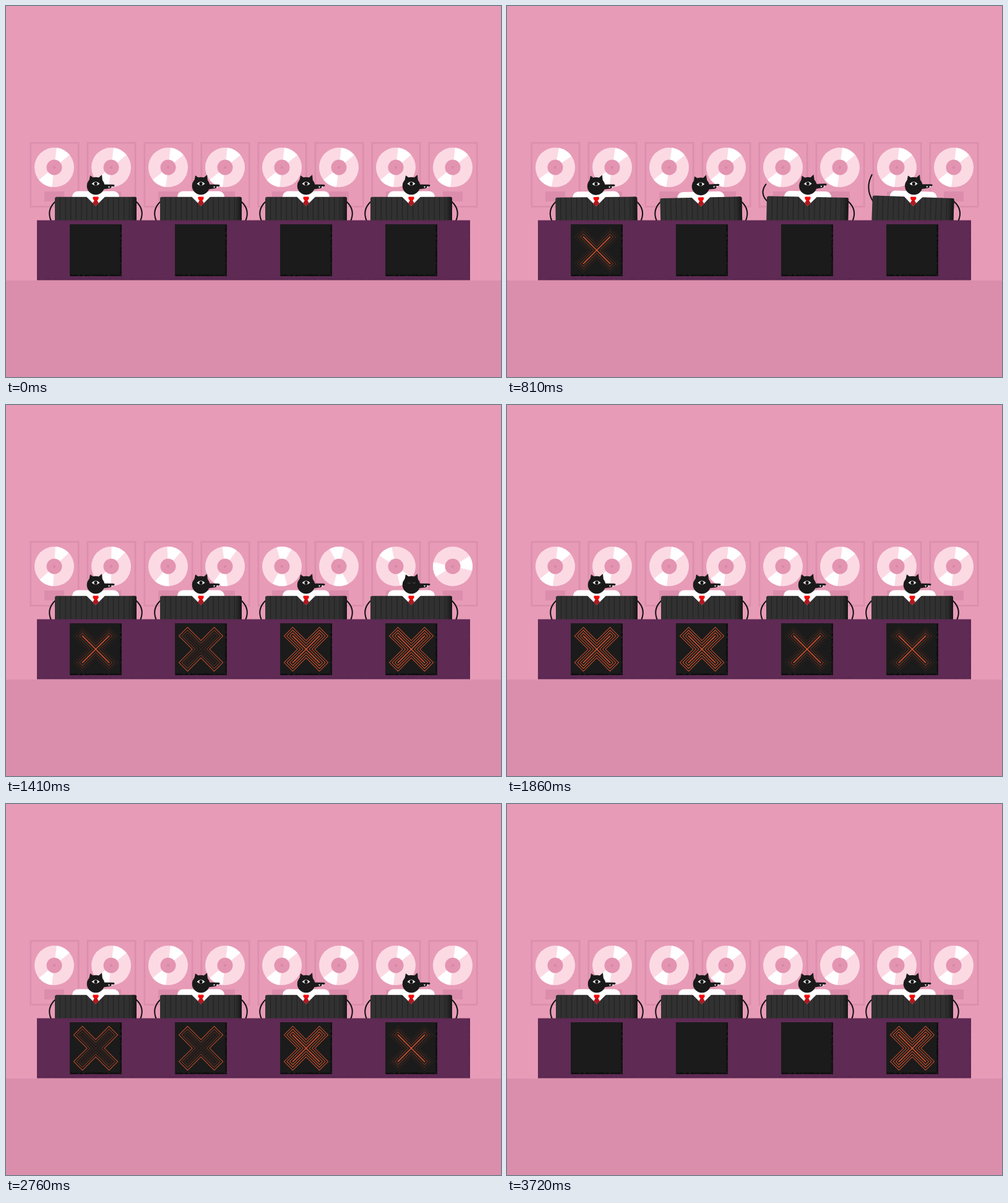
An HTML page with a canvas for the animation above (3.75 s loop, 800x600 px).

```html
<!DOCTYPE html>
<html lang="en">
<head>
<meta charset="utf-8">
<title>Four judges</title>
<style>
  html, body { margin: 0; width: 100%; height: 100%; overflow: hidden; background: #e79bb7; }
  canvas { display: block; width: 800px; height: 600px; }
</style>
</head>
<body>
<canvas id="stage" width="800" height="600"></canvas>
<script>
const ctx = document.getElementById('stage').getContext('2d');
const LOOP = 3750, STEP = 30, JUDGE_DELAY = 150;
const INK = '#1a1a1a';

const rad = d => d * Math.PI / 180;

// Smooth 0 to 1 between two times
function ramp(t, from, to) {
  const u = Math.min(1, Math.max(0, (t - from) / (to - from)));
  return u * u * (3 - 2 * u);
}

// Smooth rise to a peak and back
const bump = (t, from, peak, to) => ramp(t, from, peak) - ramp(t, peak, to);

// Symmetric, steep ease-in-out: cubic-bezier(.91, 0, .09, 1)
function steep(x) {
  if (x <= 0) return 0;
  if (x >= 1) return 1;
  let lo = 0, hi = 1, s;
  for (let i = 0; i < 24; i++) {
    s = (lo + hi) / 2;
    const v = 1 - s;
    if (2.73 * v * v * s + .27 * v * s * s + s * s * s < x) lo = s; else hi = s;
  }
  return s * s * (3 - 2 * s);
}

function box(x, y, w, h, color, r = 0) {
  ctx.fillStyle = color;
  ctx.beginPath();
  ctx.roundRect(x, y, w, h, r);
  ctx.fill();
}

function dot(x, y, r, color) {
  ctx.fillStyle = color;
  ctx.beginPath();
  ctx.arc(x, y, r, 0, 7);
  ctx.fill();
}

function shape(d, color) {
  ctx.fillStyle = color;
  ctx.fill(new Path2D(d));
}

function line(d, color, width) {
  ctx.strokeStyle = color;
  ctx.lineWidth = width;
  ctx.stroke(new Path2D(d));
}

function group(x, y, deg, draw) {
  ctx.save();
  ctx.translate(x, y);
  ctx.rotate(rad(deg));
  draw();
  ctx.restore();
}

// Seeded specks that thicken towards the right or the bottom edge
function grain(x, y, w, h, color, count) {
  let seed = 48271;
  const rnd = () => (seed = seed * 16807 % 2147483647) / 2147483647;
  const down = w > h;
  ctx.fillStyle = color;
  for (let i = 0; i < count; i++) {
    const along = rnd(), deep = Math.sqrt(rnd());
    ctx.fillRect(x + (w - 1) * (down ? along : deep), y + (h - 1) * (down ? deep : along), 1, 1);
  }
}

function record(j, t) {
  const spin = 180 * steep((t - 605 - 48 * j) / 1000);
  group(78 + 92 * j, 261, 0, () => {
    ctx.strokeStyle = '#dc8fad';
    ctx.lineWidth = 2.6;
    ctx.strokeRect(-38.2, -39.7, 77.4, 103.2);
    box(-16, 39, 32, 16, '#db8dab');
    dot(0, 0, 32, '#fcdae4');
    ctx.fillStyle = '#fff';
    for (const base of [spin, spin + 180]) {
      ctx.beginPath();
      ctx.moveTo(0, 0);
      ctx.arc(0, 0, 32, rad(base - 83), rad(base - 39));
      ctx.fill();
    }
    dot(0, 0, 12.5, '#e394b1');
    dot(0, 0, 2.2, '#d987a6');
  });
}

function head(t) {
  shape('M-11-7L-9-17L-2-12Z M11-7L10-18L3-12Z', INK);
  dot(0, 0, 14.3, INK);
  group(11, 1, 6 * bump(t, 480, 680, 900), () => shape('M-2-1H14Q16 1 12 3L0 4.5Z', INK));
  shape('M9-2.5L28-2.3Q30.8-2.3 30.5-.5Q30 1.2 27 1.2L10 2Z', INK);
  shape('M20 .8h3l-1.5 2.8Z M25 .8h3l-1.5 2.5Z', '#fff');
  if (t >= 870 && t < 1000) {
    line('M-6-3.5Q-3.5-2-1-3.5M2-3.5Q4.5-2 7-3.5', '#555', .9);
  } else {
    shape('M-6.5-3.5Q0-10 6.5-3.5Q0 2 -6.5-3.5Z', '#fff');
    dot(0, -3.6, 2.7, '#111');
  }
}

function body(t) {
  box(-38, -60.5, 76, 30, '#fff', [9, 9, 0, 0]);
  box(-66, -51.3, 132, 51, '#313131', 3);
  for (let x = -58; x < 58; x += 8.6) box(x, -51, 1, 50, '#202020');
  const shade = ctx.createLinearGradient(55, 0, 64, 0);
  shade.addColorStop(0, 'rgba(26,26,26,0)');
  shade.addColorStop(1, INK);
  box(55, -51.3, 11, 51, shade, [0, 3, 0, 0]);
  shape('M-15.5-52H15.5L0-36.5Z', '#fff');
  shape('M-2-46H2L5-41L0-36.5L-5-41Z', '#b0191f');
  shape('M-4-51.5H4Q6-49 2.5-45.5H-2.5Q-6-49 -4-51.5Z', '#f50808');
  group(0, -69, -4 * bump(t, 60, 480, 900), () => head(t));
}

// A bent arm hanging down from the shoulder; its bow always falls outwards
function arm(x, angle, reach, side) {
  const bow = -side * 8.5 * Math.cos(rad(angle)) ** 3;
  group(x, 316, side * angle, () => {
    line(`M0 0C${bow} ${reach / 3} ${bow} ${reach * 2 / 3} 0 ${reach}`, '#111', 2);
  });
}

function judge(cx, t) {
  const slam = bump(t, 560, 690, 900);
  const tilt = 2 * bump(t, 60, 390, 660) - 1.4 * slam;
  const raise = ramp(t, 60, 300) - ramp(t, 500, 650);
  const reach = 33 + 11 * bump(t, 60, 390, 500) - 6 * bump(t, 450, 540, 600);
  group(cx, 0, 0, () => {
    arm(-65 + tilt * .8, 12 + 166 * raise, reach, 1);
    arm(65 + tilt * 1.2, 12, 33, -1);
    group(-.6 * slam, 360 + slam, tilt, () => body(t));
  });
}

function cross(l, w) {
  ctx.beginPath();
  for (let k = 0; k < 4; k++) {
    const c = Math.round(Math.cos(k * Math.PI / 2)), s = Math.round(Math.sin(k * Math.PI / 2));
    for (const [x, y] of [[w, -w], [l, -w], [l, w]]) ctx.lineTo(x * c - y * s, x * s + y * c);
  }
  ctx.closePath();
  ctx.stroke();
}

function panel(cx, t) {
  box(cx - 42, 353, 84, 84, '#1b1b1b');
  grain(cx + 38, 353, 4, 84, '#0a0a0a', 130);
  grain(cx - 42, 433, 84, 4, '#0a0a0a', 130);
  const lit = t - 680;
  if (lit < 0 || lit >= 2640) return;
  // The pulse lights the core, then every ring, then the rim
  const phase = Math.floor(lit / 240) % 3;
  group(cx, 395, 45, () => {
    ctx.strokeStyle = '#d4532d';
    ctx.lineWidth = 1;
    for (let i = 0; i < 4; i++) {
      ctx.globalAlpha = .5 ** [3 - i, 0, i][phase];
      cross(40.3 - 3.2 * i, 9.9 - 3.2 * i);
    }
  });
}

function draw(t) {
  box(0, 0, 800, 600, '#e79bb7');
  box(0, 444, 800, 156, '#da8eab');
  for (let j = 0; j < 8; j++) record(j, t);
  const judges = [0, 1, 2, 3].map(i => [145 + 170 * i, t - JUDGE_DELAY * i]);
  judges.forEach(([x, local]) => judge(x, local));
  box(50, 346.6, 700, 96.8, '#5f2a54');
  grain(50, 439, 700, 4, '#592750', 700);
  grain(746, 347, 4, 96, '#592750', 100);
  judges.forEach(([x, local]) => panel(x, local));
}

const start = performance.now();
function tick() {
  const t = (performance.now() - start) % LOOP;
  draw(Math.floor(t / STEP) * STEP);
  requestAnimationFrame(tick);
}
tick();
</script>
</body>
</html>
```
